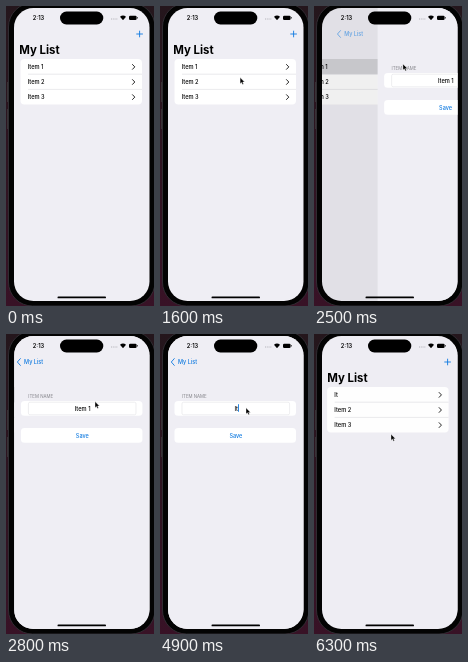
An HTML page that plays this animation: 148x300 px, repeating every 6400 ms.

```html
<!DOCTYPE html>
<html lang="en">
<head>
<meta charset="utf-8">
<title>My List</title>
<style>
  html, body { margin: 0; width: 100%; height: 100%; overflow: hidden; background: #21141b; }
  svg { display: block; width: 100vw; height: 100vh; }
  text { font: 500 5.7px Inter, "Liberation Sans", sans-serif; fill: #000; }
  .title { font-size: 11.4px; font-weight: 700; }
  .time { font-weight: 600; }
  .label { font-size: 4.4px; font-weight: 400; fill: #85858b; }
  .link { font-size: 5.5px; fill: #0f7ae0; }
  .mid { text-anchor: middle; }
  .page { fill: #efeef4; }
  .card { fill: #fff; }
  .inset { fill: none; stroke: #e2e2e6; stroke-width: .6; }
  .line { fill: none; stroke: #111; stroke-width: .9; stroke-linecap: round; stroke-linejoin: round; }
  .blue { stroke: #0f7ae0; }
  .rule { stroke: #dcdce1; stroke-width: .6; }
</style>
</head>
<body>
<svg viewBox="0 0 148 300">
  <defs>
    <clipPath id="screen"><rect x="8" y="2" width="135.5" height="293" rx="19.5"/></clipPath>
    <clipPath id="rows"><rect x="14.5" y="53" width="121.5" height="45.5" rx="4"/></clipPath>
    <linearGradient id="wall" x2="0" y2="1">
      <stop stop-color="#24161c"/>
      <stop offset="1" stop-color="#381226"/>
    </linearGradient>
  </defs>

  <!-- phone body -->
  <rect width="148" height="300" fill="url(#wall)"/>
  <path d="M1.6 76V96M1.6 103V123" stroke="#3b3739" stroke-width="1"/>
  <rect x="2.5" y="-3" width="146.5" height="303" rx="24" fill="#030303" stroke="#37343a" stroke-width=".8"/>

  <g clip-path="url(#screen)">
    <rect class="page" x="8" y="2" width="136" height="293"/>

    <g id="list">
      <g clip-path="url(#rows)">
        <rect class="card" x="14" y="53" width="123" height="46"/>
        <rect id="press" x="14" y="53" width="123" height="15.2" fill="#d3d3d8"/>
      </g>
      <path class="rule" d="M22 68.2H136M22 83.4H136"/>
      <text id="first" x="21.7" y="63.1">Item 1</text>
      <text x="21.7" y="78.2">Item 2</text>
      <text x="21.7" y="93.3">Item 3</text>
      <path class="line" d="M126.5 58.5l2.3 2.4-2.3 2.4m0 10.3l2.3 2.4-2.3 2.4m0 10.3l2.3 2.4-2.3 2.4"/>
    </g>
    <rect id="dim" x="8" y="2" width="136" height="293"/>

    <g id="detail">
      <rect class="page" x="8" y="2" width="136" height="293"/>
      <text class="label" x="21.9" y="63.8">ITEM NAME</text>
      <rect class="card" x="14.5" y="67" width="121.5" height="14.8" rx="3.6"/>
      <rect class="inset" x="22" y="68.2" width="107.6" height="12.6" rx="1.6"/>
      <text id="field" class="mid" x="76.2" y="76.7"></text>
      <rect id="caret" y="70.2" width=".9" height="7.6" fill="#0f7ae0"/>
      <rect class="card" x="14.5" y="94" width="121.5" height="14.8" rx="3.6"/>
      <text class="link mid" x="75.9" y="104">Save</text>
    </g>

    <!-- navigation bar -->
    <g id="bar">
      <path class="line blue" d="M130.7 28H136.5M133.6 25.1V30.9"/>
      <text class="title" x="13.2" y="47.8">My List</text>
    </g>
    <g id="back">
      <path class="line blue" d="M14.3 24.6L11.3 28l3 3.4"/>
      <text class="link" x="18" y="30">My List</text>
    </g>

    <!-- status bar -->
    <text class="time" x="26.8" y="14">2:13</text>
    <path d="M105 13H111.5" stroke="#a5a5ab" stroke-width=".9" stroke-dasharray=".9 .9"/>
    <path d="M114 10.7Q117 8.4 120 10.7L117 14.2Z"/>
    <rect x="123" y="9.7" width="7.6" height="4.2" rx="1.2"/>
    <rect x="131" y="11" width=".7" height="1.6" rx=".3"/>
    <rect x="51.5" y="290.6" width="48.5" height="1.7" rx=".85"/>
  </g>
  <rect x="54" y="5.5" width="43.3" height="12.9" rx="6.45"/>

  <path id="cursor" d="M0 0V6.2L1.4 4.9 2.4 7 3.5 6.5 2.6 4.6H4.5Z" stroke="#fff" stroke-width=".4"/>
</svg>

<script>
  const LOOP = 6400, STEP = 100;
  const PUSH = 2400, POP = 6040;
  const ERASE = [4000, 4200, 4400, 4900];
  const $ = id => document.getElementById(id);

  // time, x, y
  const path = [
    [0, 22, 300], [200, 42, 243], [400, 66, 160], [600, 82, 104], [700, 83, 96],
    [800, 83, 96], [900, 82, 93.5], [1000, 80, 91], [1100, 80, 91],
    [1400, 78, 75], [1500, 78, 75], [2000, 88.5, 57.5], [2600, 89, 58],
    [2800, 89, 67.5], [3000, 88, 72], [3500, 88, 72.5], [3600, 86, 73.8],
    [5300, 86, 73.8], [5900, 77, 100.2], [6400, 77, 100.2]
  ];

  function cursorAt(t) {
    const i = Math.max(1, path.findIndex(p => p[0] >= t));
    const [t0, x0, y0] = path[i - 1], [t1, x1, y1] = path[i];
    const k = (t - t0) / (t1 - t0);
    return [x0 + (x1 - x0) * k, y0 + (y1 - y0) * k];
  }

  // critically damped spring, 0 to 1
  function spring(ms) {
    const k = Math.max(0, ms) / 50;
    return 1 - (1 + k) * Math.exp(-k);
  }

  const fieldText = t => "Item 1".slice(0, 6 - ERASE.filter(e => t >= e).length);
  const move = (el, x, y = 0) => el.setAttribute("transform", `translate(${x} ${y})`);

  function draw(t) {
    const open = t < POP ? spring(t - PUSH) : 1 - spring(t - POP);
    move($("list"), -40 * open);
    move($("detail"), 137 * (1 - open));
    move($("back"), 30 * (1 - open));
    $("back").style.opacity = open > .1 ? open : 0;
    $("bar").style.opacity = Math.min(1, Math.max(0, 1.1 - 2 * open));
    $("dim").style.opacity = .1 * open;
    $("press").style.opacity = t >= PUSH && t < 3000 ? 1 : 0;
    $("first").textContent = t < POP ? "Item 1" : fieldText(t);

    const field = $("field");
    field.textContent = fieldText(t);
    $("caret").setAttribute("x", 76.3 + field.getComputedTextLength() / 2);
    $("caret").style.opacity = t >= 3400 && t < 6000 ? 1 : 0;

    move($("cursor"), ...cursorAt(t));
    $("cursor").style.opacity = t >= 100 ? 1 : 0;
  }

  function tick(now) {
    // the picture advances ten times a second
    draw(Math.floor((now % LOOP) / STEP) * STEP);
    requestAnimationFrame(tick);
  }
  draw(0);
  requestAnimationFrame(tick);
</script>
</body>
</html>
```
